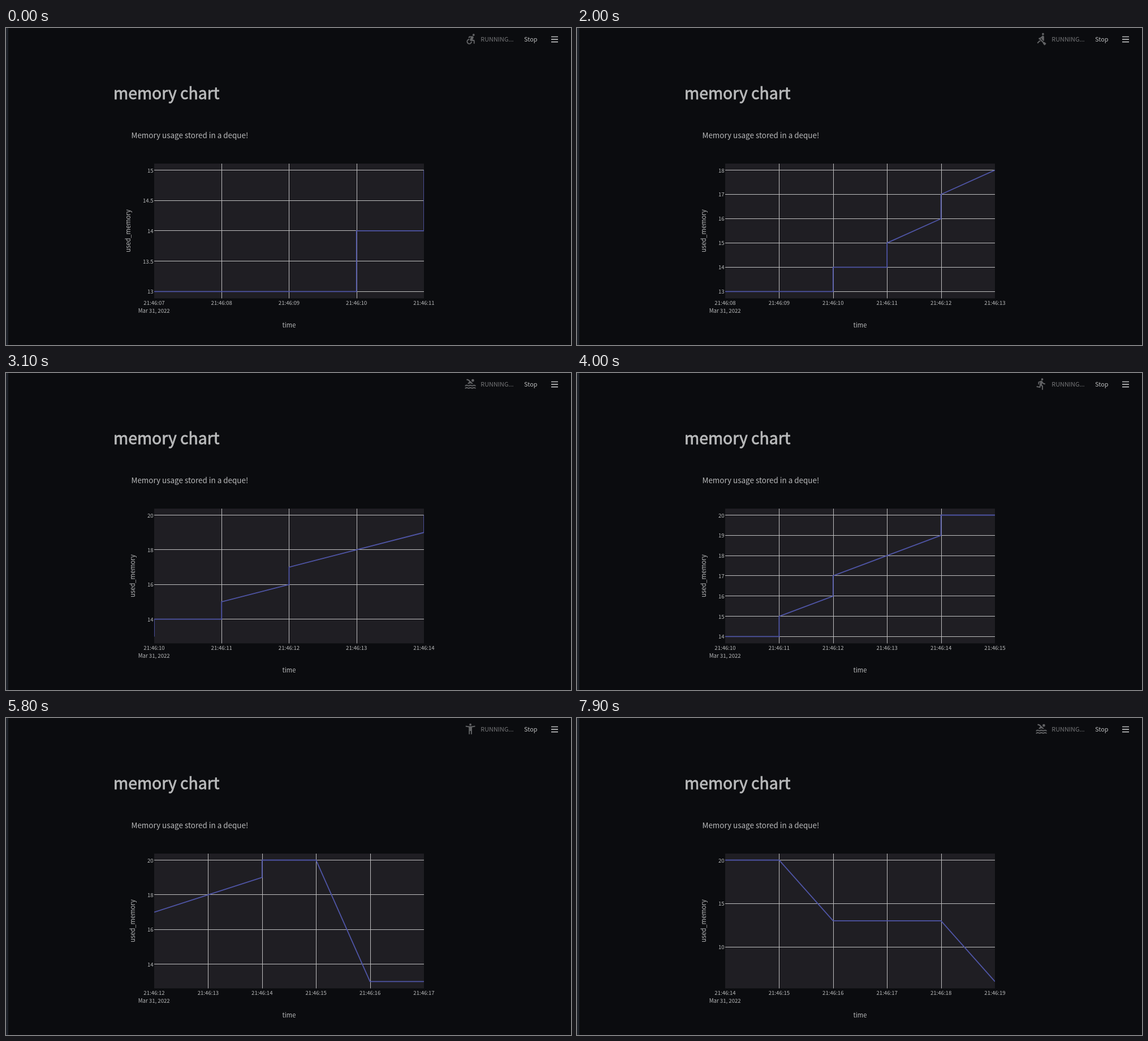
These frames come from a looping animation (999 by 561 pixels, 8 s). An HTML page:

```html
<!DOCTYPE html>
<html lang="en">
<head>
<meta charset="utf-8">
<title>memory chart</title>
<style>
  html, body { margin: 0; width: 100%; height: 100%; overflow: hidden; background: #0b0c0f; }
  svg { display: block; width: 999px; height: 561px; }
  text { font: 11.2px "Noto Sans CJK JP", "Noto Sans CJK SC", "Noto Sans CJK", "Noto Sans", sans-serif; fill: #b9babb; }
  text.heading { font-size: 28.3px; stroke: #b9babb; stroke-width: .8px; }
  text.body { font-size: 13.45px; }
  text.status { font-size: 10.9px; }
  text.tick { font-size: 9.65px; }
  .mid { text-anchor: middle; }
  .end { text-anchor: end; }
  .grid { stroke: #bfbfc0; stroke-width: 1; }
</style>
</head>
<body>
<svg viewBox="0 0 999 561">
  <rect width="999" height="561" fill="#0b0c0f"/>
  <rect width="4" height="561" fill="#1f232a"/>
  <path id="icon" transform="translate(809.7 7.9) scale(.95)" fill="#626365"/>
  <text class="status" x="839.3" y="24" style="fill:#77787a">RUNNING...</text>
  <text class="status" x="916" y="24">Stop</text>
  <path d="M964 15.5h12M964 20.1h12M964 24.7h12" stroke="#b9babb" stroke-width="1.7"/>
  <text class="heading" x="190" y="126">memory chart</text>
  <text class="body" x="221.5" y="195">Memory usage stored in a deque!</text>
  <clipPath id="plotArea"><rect x="262" y="240" width="477" height="238.5"/></clipPath>
  <rect x="262" y="240" width="477" height="238.5" fill="#1f1e23"/>
  <g id="axes"></g>
  <path id="trace" clip-path="url(#plotArea)" fill="none" stroke="#4f55a6" stroke-width="1.8"/>
  <text id="yTitle" class="mid">used_memory</text>
  <text class="tick mid" x="261.7" y="504.3">Mar 31, 2022</text>
  <text class="mid" x="500.5" y="530">time</text>
</svg>
<script>
const LOOP = 8000, ICON_MS = 200, WINDOW = 10, FIRST_SECOND = 7;
const plot = { left: 262, right: 739, top: 240, bottom: 478.5 };

// Two samples per second; the chart shows the latest ten.
const samples = [13, 13, 13, 13, 13, 13, 13, 14, 14, 15, 16, 17, 18,
                 18, 19, 20, 20, 20, 13, 13, 13, 13, 13, 13, 6];
const updates = [500, 1000, 1600, 2100, 2600, 3100, 3700, 4200,
                 4700, 5300, 5800, 6400, 6800, 7400, 7900];

const dot = (x, y, r) => `M${x - r} ${y}a${r} ${r} 0 1 0 ${2 * r} 0a${r} ${r} 0 1 0 ${-2 * r} 0z`;
const wheel = x => dot(x, 17, 5) +
  `M${x - 3.5} 17a3.5 3.5 0 1 1 7 0a3.5 3.5 0 1 1 -7 0z`;
const wave = y =>
  `M2 ${y + 1}c.6 0 .8-.1 1.2-.4s1-.6 2.1-.6 1.7.4 2.2.6.6.4 1.2.4.8-.1 1.1-.4 1.1-.6 2.2-.6 1.7.4 2.2.6.6.4 1.1.4.8-.1 1.2-.4 1.1-.6 2.2-.6 1.7.4 2.2.6.6.4 1.1.4v2` +
  "c-1.1 0-1.7-.4-2.2-.6s-.6-.4-1.1-.4-.8.1-1.2.4-1.1.6-2.2.6-1.7-.4-2.2-.6-.6-.4-1.1-.4-.8.1-1.2.4-1.1.6-2.2.6-1.7-.4-2.2-.6-.6-.4-1.1-.4-.8.1-1.2.4-1.1.6-2.1.6z";
const icons = [
  // wheelchair
  dot(18, 4.5, 2) + "M15 17h-2c0 1.65-1.35 3-3 3s-3-1.35-3-3 1.35-3 3-3v-2c-2.76 0-5 2.24-5 5s2.24 5 5 5 5-2.24 5-5zm3-3.5h-1.86l1.67-3.67C18.42 8.5 17.44 7 15.96 7h-5.2c-.81 0-1.54.47-1.87 1.2L8.22 10l1.92.53.65-1.53H13l-1.83 4.1c-.6 1.33.39 2.9 1.85 2.9H18v5h2v-5.5c0-1.1-.9-2-2-2z",
  // bicycle
  dot(15.5, 3.5, 2) + wheel(5) + wheel(19) + "M10.8 10.5l2.4-2.4.8.8c1.3 1.3 3 2.1 5.1 2.1V9c-1.5 0-2.7-.6-3.6-1.5l-1.9-1.9c-.5-.4-1-.6-1.6-.6s-1.1.2-1.4.6L7.8 8.4c-.4.4-.6.9-.6 1.4 0 .6.2 1.1.6 1.4L11 14v5h2v-6.2z",
  // runner
  dot(13.5, 3.5, 2) + "M9.9 19.4l1-4.4 2.1 2v6h2v-7.5l-2.1-2 .6-3c1.3 1.5 3.3 2.5 5.5 2.5v-2c-1.9 0-3.5-1-4.3-2.4l-1-1.6c-.4-.6-1-1-1.7-1-.3 0-.5.1-.8.1l-5.2 2.2v4.7h2v-3.4l1.8-.7-1.6 8.1-4.9-1-.4 2z",
  // swimmer
  dot(16.5, 5.5, 2.5) + wave(13.5) + wave(18) + "M8.67 12c.56 0 .78-.13 1.15-.36.46-.27 1.08-.64 2.19-.64 1.11 0 1.73.37 2.18.64.37.22.6.36 1.15.36s.78-.13 1.15-.36l.41-.23L10.48 5C8.93 3.45 7.5 2.99 5 3v2.5c1.82-.01 2.89.39 4 1.5l1 1-3.25 3.25c.31.12.56.27.77.39.37.23.59.36 1.15.36z",
  // rower
  dot(15, 3, 2) + "M8.5 14.5L4 19l1.5 1.5L9 17h2zM21 21l-3 3-3-3v-1.5l-7.1-7.1-.9.1v-2.2c1.66 0 3.6-.9 4.7-2l1.4-1.6c.4-.5 1-.7 1.6-.7C16 6 17 7 17 8.3V14c0 .8-.35 1.6-.9 2.2l-3.6-3.6v-2.3c-.6.5-1.4 1-2.3 1.4l6.3 6.3H18z",
  // standing figure
  dot(12, 4, 2) + "M20.5 6c-2.6.7-5.7 1-8.5 1s-5.9-.3-8.5-1L3 8c1.9.5 4 .8 6 1v13h2v-6h2v6h2V9c2-.2 4.1-.5 6-1z"
];

const byId = id => document.getElementById(id);
const crispX = x => Math.round(x - .1) + .5;
const crispY = y => Math.floor(y) + .5;
const second = i => FIRST_SECOND + Math.floor(i / 2);
const clock = s => "21:46:" + String(s).padStart(2, "0");
const gridLine = (x1, y1, x2, y2) => `<line class="grid" x1="${x1}" y1="${y1}" x2="${x2}" y2="${y2}"/>`;
const label = (x, y, align, text) => `<text class="tick ${align}" x="${x}" y="${y}">${text}</text>`;

function tickStep(range) {
  const rough = range / 6.96, base = 10 ** Math.floor(Math.log10(rough));
  return base * [2, 5, 10].find(n => n >= rough / base);
}

function drawChart(last) {
  const first = last - WINDOW + 1;
  const shown = samples.slice(first, last + 1);
  const low = Math.min(...shown), high = Math.max(...shown);
  const start = second(first), stop = second(last);
  const xOf = s => plot.left + (s - start) / (stop - start) * (plot.right - plot.left);
  const yOf = v => 466.4 - (v - low) / (high - low) * 214.9;
  const pad = (high - low) / 18, step = tickStep(high - low + 2 * pad);

  let lines = "", labels = "";
  for (let s = start; s <= stop; s++) {
    const x = xOf(s);
    if (s > start && s < stop) lines += gridLine(crispX(x), plot.top, crispX(x), plot.bottom);
    labels += label(x, 490.2, "mid", clock(s));
  }
  for (let v = Math.ceil((low - pad) / step) * step; v <= high + pad; v += step) {
    const y = yOf(v);
    lines += gridLine(plot.left, crispY(y), plot.right, crispY(y));
    labels += label(260.7, y + 4, "end", +v.toFixed(1));
  }
  byId("axes").innerHTML = lines + labels;
  byId("trace").setAttribute("d", "M" + shown.map((v, i) => `${xOf(second(first + i))} ${yOf(v)}`).join("L"));
  byId("yTitle").setAttribute("transform", `translate(${step < 1 ? 219.7 : 227.7} 359) rotate(-90)`);
}

let drawn = -1;
const begin = performance.now();
function render() {
  const t = (performance.now() - begin) % LOOP;
  byId("icon").setAttribute("d", icons[Math.floor(t / ICON_MS) % icons.length]);
  const last = WINDOW - 1 + updates.filter(u => u <= t).length;
  if (last !== drawn) drawChart(drawn = last);
  requestAnimationFrame(render);
}
render();
</script>
</body>
</html>
```
